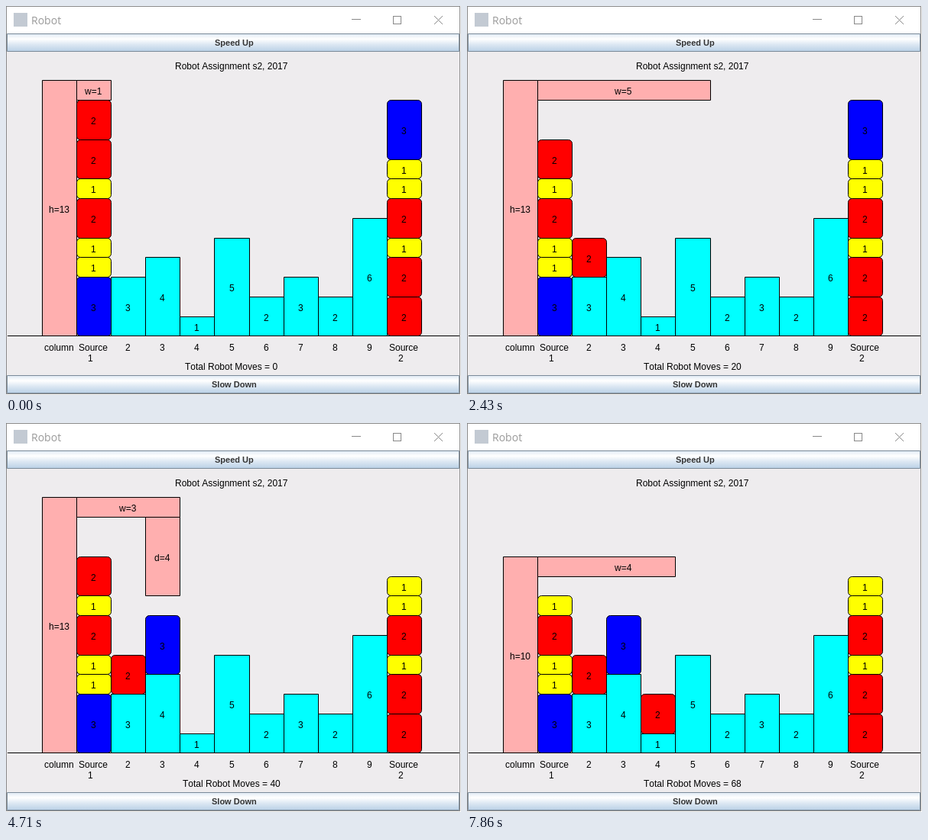
Write an HTML page with a canvas that moves like this. It is 595 by 510 pixels and loops after 8000 ms.

```html
<!DOCTYPE html>
<html lang="en">
<head>
<meta charset="utf-8">
<title>Robot</title>
<style>
  html, body { margin: 0; width: 100%; height: 100%; overflow: hidden; background: #fff; }
  canvas { display: block; }
</style>
</head>
<body>
<canvas id="stage" width="595" height="510"></canvas>
<script>
const ctx = document.getElementById('stage').getContext('2d');
const LOOP = 8000, TICKS = 56;
const BARS = [0, 3, 4, 1, 5, 2, 3, 2, 6, 0];
const BLOCK_COLORS = { 1: '#ff0', 2: '#f00', 3: '#00f' };
const PINK = '#ffafaf', SANS = '"Liberation Sans", Arial, sans-serif';

// Column 0 holds the mast, columns 1 to 10 the stacks; level 0 is the ground.
const colX = i => Math.floor(47 + 45.18 * i);
const levelY = l => Math.round(432.48 - 25.77 * l);
const sum = list => list.reduce((a, b) => a + b, 0);

// Each entry drives one arm part to a value, one unit per move; pick and drop cost a move.
const PLAN = [
  ['pick'], ['w', 2], ['d', 7], ['drop'], ['d', 0],
  ['w', 10], ['pick'], ['w', 3], ['d', 5], ['drop'], ['d', 0],
  ['w', 1], ['h', 11], ['pick'], ['w', 4], ['d', 7], ['drop'], ['d', 0],
  ['h', 10]
];

function buildStates() {
  const stacks = BARS.map(() => []);
  stacks[0] = [3, 1, 1, 2, 1, 2, 2];
  stacks[9] = [2, 2, 1, 2, 1, 1, 3];
  const arm = { h: 13, w: 1, d: 0, held: 0 };
  const states = [];
  const save = () => states.push({ ...arm, stacks: stacks.map(s => [...s]) });
  save();
  for (const [part, goal] of PLAN) {
    const stack = stacks[arm.w - 1];
    if (part === 'pick') {
      arm.held = stack.pop();
      save();
    } else if (part === 'drop') {
      stack.push(arm.held);
      arm.held = 0;
      save();
    } else {
      while (arm[part] !== goal) {
        arm[part] += Math.sign(goal - arm[part]);
        save();
      }
    }
  }
  return states;
}
const states = buildStates();

// Text centred on x, starting on a whole pixel.
function text(str, x, y, font = '12px ' + SANS, color = '#000') {
  ctx.font = font;
  ctx.fontKerning = 'none';
  ctx.fillStyle = color;
  ctx.fillText(str, Math.round(x - ctx.measureText(str).width / 2), y);
}

function line(color, ...points) {
  ctx.strokeStyle = color;
  ctx.beginPath();
  points.forEach(([x, y]) => ctx.lineTo(x, y));
  ctx.stroke();
}

function box(x, y, w, h, fill, radius = 0, stroke = '#000') {
  ctx.beginPath();
  ctx.roundRect(x + 0.5, y + 0.5, w, h, radius);
  ctx.fillStyle = fill;
  ctx.fill();
  ctx.strokeStyle = stroke;
  ctx.stroke();
}

// A box covering columns c0..c1 and levels l0..l1, with a label in column labelCol.
function cell(c0, c1, l0, l1, fill, label, radius = 0, labelCol = c0) {
  const x = colX(c0), top = levelY(l1), bottom = levelY(l0);
  box(x, top, colX(c1) - x, bottom - top, fill, radius);
  text(label, (colX(labelCol) + colX(labelCol + 1)) / 2, Math.round((top + bottom) / 2 + 6));
}

const block = (col, level, size) =>
  cell(col, col + 1, level, level + size, BLOCK_COLORS[size], size, 5);

function button(y, label) {
  const shade = ctx.createLinearGradient(0, y, 0, y + 24);
  [[0, '#dde8f3'], [0.3, '#fff'], [0.6, '#dde8f3'], [1, '#b8cfe5']]
    .forEach(([at, color]) => shade.addColorStop(at, color));
  box(1, y, 591, 23, shade, 0, '#7a8a99');
  text(label, 298, y + 16, 'bold 11px ' + SANS, '#333');
}

function drawWindow() {
  ctx.fillStyle = '#fff';
  ctx.fillRect(0, 0, 595, 510);
  ctx.fillStyle = '#eeecee';
  ctx.fillRect(1, 36, 592, 472);
  ctx.strokeStyle = '#8a8a8a';
  ctx.strokeRect(0.5, 0.5, 593, 508);

  ctx.fillStyle = '#c3cad3';
  ctx.fillRect(10, 9, 18, 18);
  text('Robot', 52.5, 24, '14px "Open Sans", "Noto Sans", sans-serif', '#999');
  line('#888', [452, 17.5], [464, 17.5]);
  ctx.strokeRect(506.5, 13.5, 10, 10);
  line('#888', [560, 13], [571, 24]);
  line('#888', [571, 13], [560, 24]);

  button(36, 'Speed Up');
  button(484, 'Slow Down');
}

function drawScene(move) {
  const { h, w, d, held, stacks } = states[move];
  drawWindow();
  text('Robot Assignment s2, 2017', 294.5, 83);
  line('#000', [2, 432.5], [593, 432.5]);

  const labels = ['column', 'Source', 2, 3, 4, 5, 6, 7, 8, 9, 'Source'];
  labels.forEach((label, i) => text(label, (colX(i) + colX(i + 1)) / 2, 452));
  text('1', 110, 466);
  text('2', 516, 466);
  text('Total Robot Moves = ' + move, 295, 477);

  cell(0, 1, 0, h, PINK, 'h=' + h);
  cell(1, w + 1, h - 1, h, PINK, 'w=' + w, 0, 1 + Math.floor(w / 2));
  if (d) cell(w, w + 1, h - 1 - d, h - 1, PINK, 'd=' + d);

  BARS.forEach((bar, i) => {
    if (bar) cell(i + 1, i + 2, 0, bar, '#0ff', bar);
    stacks[i].forEach((size, n) => block(i + 1, bar + sum(stacks[i].slice(0, n)), size));
  });

  if (held) {
    const grip = h - 1 - d;
    block(w, grip - held, held);
    ctx.fillStyle = '#808080';
    ctx.fillRect(colX(w), levelY(grip) - 4, 3, 8);
    ctx.fillRect(colX(w + 1) - 2, levelY(grip) - 4, 3, 8);
  }
}

// The arm makes slightly more than one move per screen refresh.
function moveAt(time) {
  const tick = Math.floor((time % LOOP) / LOOP * TICKS + 0.03);
  return Math.min(states.length - 1, Math.max(0, Math.floor(1.27 * tick - 1.35)));
}

let start;
function frame(now) {
  start ??= now;
  drawScene(moveAt(now - start));
  requestAnimationFrame(frame);
}
drawScene(0);
requestAnimationFrame(frame);
</script>
</body>
</html>
```
